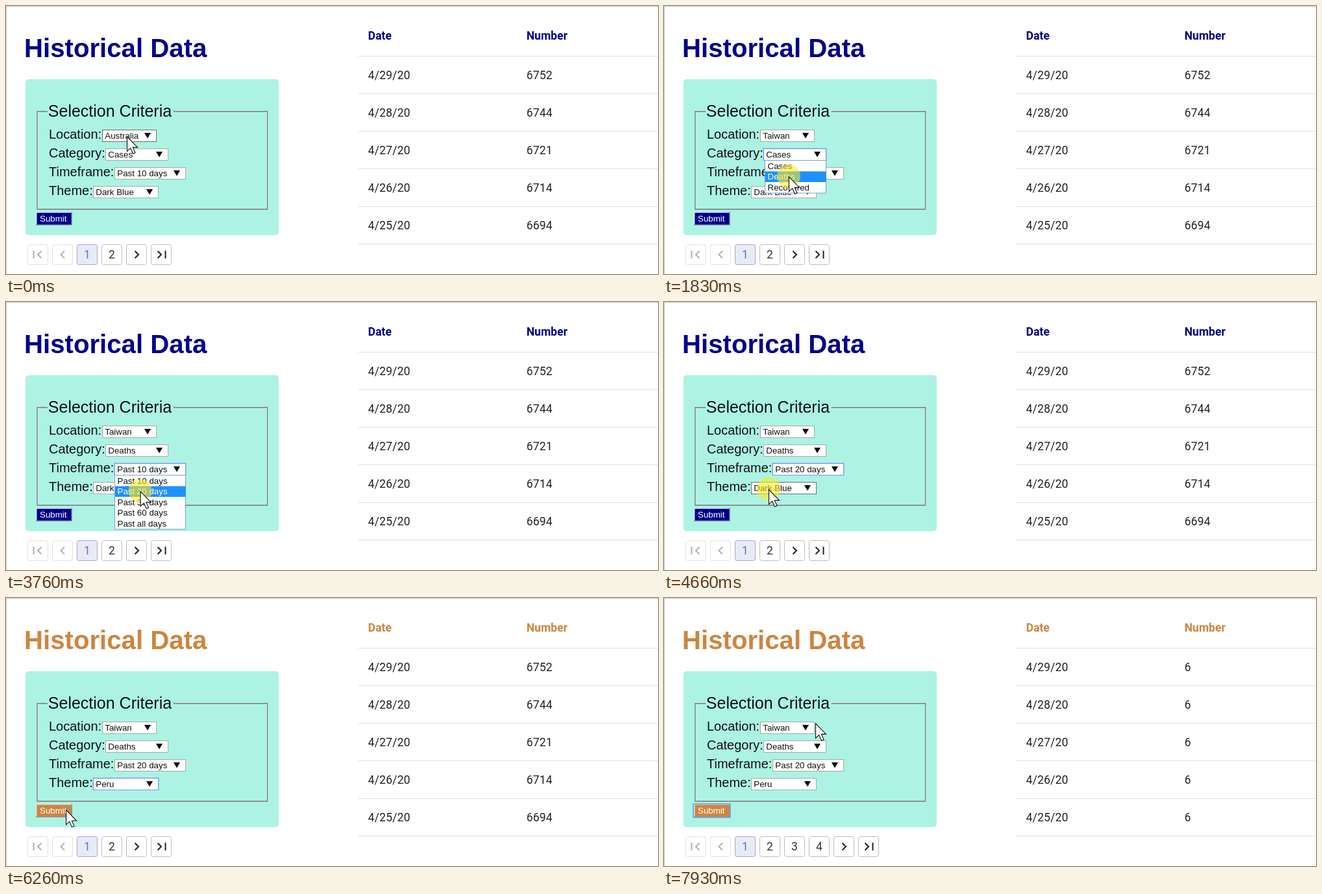
An HTML page that plays this animation: 1004 px wide and 414 px high, repeating every 8000 ms.

```html
<!DOCTYPE html>
<html lang="en">
<head>
<meta charset="utf-8">
<title>Historical Data</title>
<style>
  html, body { margin: 0; width: 100%; height: 100%; overflow: hidden; background: #fff; }
  svg { display: block; font-family: "Liberation Sans", Arial, sans-serif; }
  text { white-space: pre; }
  .table { font-family: Roboto, sans-serif; font-size: 17.5px; }
  .cell { letter-spacing: .19px; }
</style>
</head>
<body>
<svg id="stage" width="1004" height="414" viewBox="0 0 1004 414"></svg>
<script>
const LOOP = 8000;
const stage = document.getElementById("stage");
const NAVY = "#00008b", PERU = "#cd853f", INK = "#111", FOCUS = "#6f9ce6";

// Each select: box, options, opening span, focus span, chosen option before and after closing
const selects = [
  { label: "Location:", x: 148, y: 191, w: 84, options: ["Australia", "Taiwan", "US"],
    open: [420, 1050], focus: [120, 1330], from: 0, to: 1 },
  { label: "Category:", x: 153, y: 220, w: 97, options: ["Cases", "Deaths", "Recovered"],
    open: [1470, 1920], focus: [1330, 2900], from: 0, to: 1, inset: 2 },
  { label: "Timeframe:", x: 167, y: 249, w: 110,
    options: ["Past 10 days", "Past 20 days", "Past 30 days", "Past 60 days", "Past all days"],
    open: [3000, 3880], focus: [2900, 4710], from: 0, to: 1 },
  { label: "Theme:", x: 134, y: 278, w: 101, options: ["Peru", "Dark Blue", "Dark Green"],
    open: [4780, 5830], focus: [4710, 6350], from: 1, to: 0 }
];

// Cursor path: time, x, y
const path = [
  [0, 186, 201], [480, 186, 201], [800, 187, 227], [1060, 187, 227], [1320, 189, 231],
  [1540, 189, 231], [1740, 192, 263], [2450, 192, 263], [2640, 203, 281], [2860, 209, 264],
  [3240, 209, 264], [3600, 207, 292], [4200, 205, 292], [4560, 161, 289], [4900, 161, 289],
  [5400, 167, 312], [5900, 167, 312], [6300, 90, 327], [6930, 90, 327], [7600, 307, 183],
  [7680, 307, 183], [7910, 233, 193], [LOOP, 233, 193]
];

const clicks = [[120, 420], [880, 1130], [1330, 1560], [1760, 2000], [2900, 3250],
  [3720, 3960], [4570, 4820], [5660, 5900], [6350, 6570]];

const within = (t, [a, b]) => t >= a && t < b;

function cursorAt(t) {
  const i = path.findIndex(p => p[0] > t);
  const [t0, x0, y0] = path[i - 1], [t1, x1, y1] = path[i];
  const u = (t - t0) / (t1 - t0), e = u * u * (3 - 2 * u);
  return { x: x0 + (x1 - x0) * e, y: y0 + (y1 - y0) * e };
}

const text = (x, y, str, size, fill = INK, extra = "") =>
  `<text x="${x}" y="${y}" font-size="${size}" fill="${fill}" ${extra}>${str}</text>`;
const rect = (x, y, w, h, fill, stroke = "none", extra = "") =>
  `<rect x="${x}" y="${y}" width="${w}" height="${h}" fill="${fill}" stroke="${stroke}" ${extra}/>`;
const line = (d, stroke, width = 1, fill = "none") =>
  `<path d="${d}" fill="${fill}" stroke="${stroke}" stroke-width="${width}"/>`;

function drawSelect(s, t, cursor, covered) {
  const { x, y, w } = s, right = x + w;
  const over = !covered && cursor.x >= x && cursor.x < right && cursor.y >= y && cursor.y < y + 19;
  const focused = within(t, s.focus);
  const border = focused ? FOCUS : over ? "#6e6e6e" : "#a9a9a9";
  const value = s.options[t < s.open[1] ? s.from : s.to];
  return text(66, y + 14, s.label, 20)
    + (focused ? rect(x - .5, y - .5, w + 1, 19, "none", "#a9c6f2") : "")
    + rect(x + .5, y + .5, w - 1, 18, "#fff", border)
    + text(x + 4.3, y + 14, value, 13.33)
    + `<path d="M${right - 19} ${y + 5}h10l-5 8.5z" fill="#000"/>`;
}

function drawList(s, cursor) {
  const step = 16.5, inset = s.inset || 0;
  const x = s.x + inset, w = s.w - inset, top = s.y + 18, h = s.options.length * step + 2;
  const hit = Math.floor((cursor.y - top - 1) / step);
  const inside = cursor.x >= x && cursor.x < x + w && hit >= 0 && hit < s.options.length;
  const active = inside ? hit : s.from;
  const items = s.options.map((option, i) => {
    const y = top + 1 + i * step;
    return (i === active ? rect(x + 1, y, w - 1.5, step, "#1e90ff") : "")
      + text(x + 4.5, y + 12.5, option, 13.33, i === active ? "#fff" : INK);
  });
  return rect(x + .5, top + .5, w - 1, h - 1, "#fff", "#7d9fd0") + items.join("");
}

function drawSubmit(t, color) {
  return rect(46, 318, 56, 21, color)
    + line("M46.75 339V318.75H102", "#d5e6e6", 1.5)
    + line("M46 338.25H101.25V318", "#8f9a9a", 1.5)
    + text(52, 333, "Submit", 13.33, "#fff")
    + (t >= 6350 ? rect(45, 318, 57, 21, "none", FOCUS, 'stroke-width="1.7" rx="1"') : "");
}

function drawTable(color, loaded) {
  const numbers = loaded ? [6, 6, 6, 6, 6] : [6752, 6744, 6721, 6714, 6694];
  let out = text(557.5, 52, "Date", 17.5, color, 'font-weight="700"')
    + text(801.5, 52, "Number", 17.5, color, 'font-weight="700"')
    + line("M542 77.5H1004", "#e0e0e0");
  numbers.forEach((n, i) => {
    const y = 113 + i * 58;
    out += text(557.5, y, `4/${29 - i}/20`, 17.5, "#212121", 'class="cell"')
      + text(801.5, y, n, 17.5, "#212121", 'class="cell"')
      + line(`M542 ${y + 22.5}H1004`, "#e0e0e0");
  });
  return `<g class="table">${out}</g>`;
}

function drawPager(loaded) {
  const icons = {
    first: "M-6.5 -6V6M5.5 -5.5L0 0L5.5 5.5", prev: "M3 -5.5L-2.5 0L3 5.5",
    next: "M-2.5 -5.5L3 0L-2.5 5.5", last: "M6.5 -6V6M-5.5 -5.5L0 0L-5.5 5.5"
  };
  const pages = loaded ? [1, 2, 3, 4] : [1, 2];
  const out = ["first", "prev", ...pages, "next", "last"].map((key, i) => {
    const x = 33 + i * 38, off = i < 2, current = key === 1;
    const border = current ? "#9fa8cf" : off ? "#e0e0e0" : "#bdbdbd";
    const face = icons[key]
      ? `<g transform="translate(${x + 16} 384)">${line(icons[key], off ? "#b0b0b0" : "#212121", 2)}</g>`
      : text(x + 16, 390, key, 17.5, current ? "#5c75b8" : "#333", 'text-anchor="middle"');
    return rect(x + .5, 368.5, 31, 31, current ? "#e8eaf6" : "#fff", border, 'rx="3"') + face;
  });
  return `<g class="table">${out.join("")}</g>`;
}

function drawCursor(t, { x, y }) {
  const pressed = clicks.some(span => within(t, span));
  return (pressed ? `<circle cx="${x}" cy="${y}" r="18" fill="#ffeb1e" opacity=".58"/>` : "")
    + `<g transform="translate(${x} ${y})">`
    + line("M.5 .8V23.5L5.7 18.7L9.6 27.3L13 25.8L9.3 17.4H16.5Z", "#111", 1.1, "#fff") + "</g>";
}

function render(t) {
  const cursor = cursorAt(t);
  const color = t < 5900 ? NAVY : PERU;
  const loading = within(t, [6590, 6830]), loaded = t >= 6830;
  const opened = selects.find(s => within(t, s.open));
  stage.innerHTML =
    rect(0, 0, 1004, 414, "#fff")
    + line("M.5 414V.5H1004", "#c4c4c4")
    + text(28, 78.5, "Historical Data", 40.2, color, 'font-weight="700"')
    + rect(30, 113, 390, 241, "#acf3e4", "none", 'rx="5"')
    + line("M64 164H49V313.5H401.5V164H258", "#d3f5ee")
    + line("M64 163H48V314H402.5V163H258", "#7d7474", 1.3)
    + text(64.8, 171, "Selection Criteria", 25)
    + selects.map(s => drawSelect(s, t, cursor, opened)).join("")
    + drawSubmit(t, color)
    + (loading ? "" : drawTable(color, loaded) + drawPager(loaded))
    + (opened ? drawList(opened, cursor) : "")
    + drawCursor(t, cursor);
}

const start = performance.now();
function tick() {
  render((performance.now() - start) % LOOP);
  requestAnimationFrame(tick);
}
tick();
</script>
</body>
</html>
```
